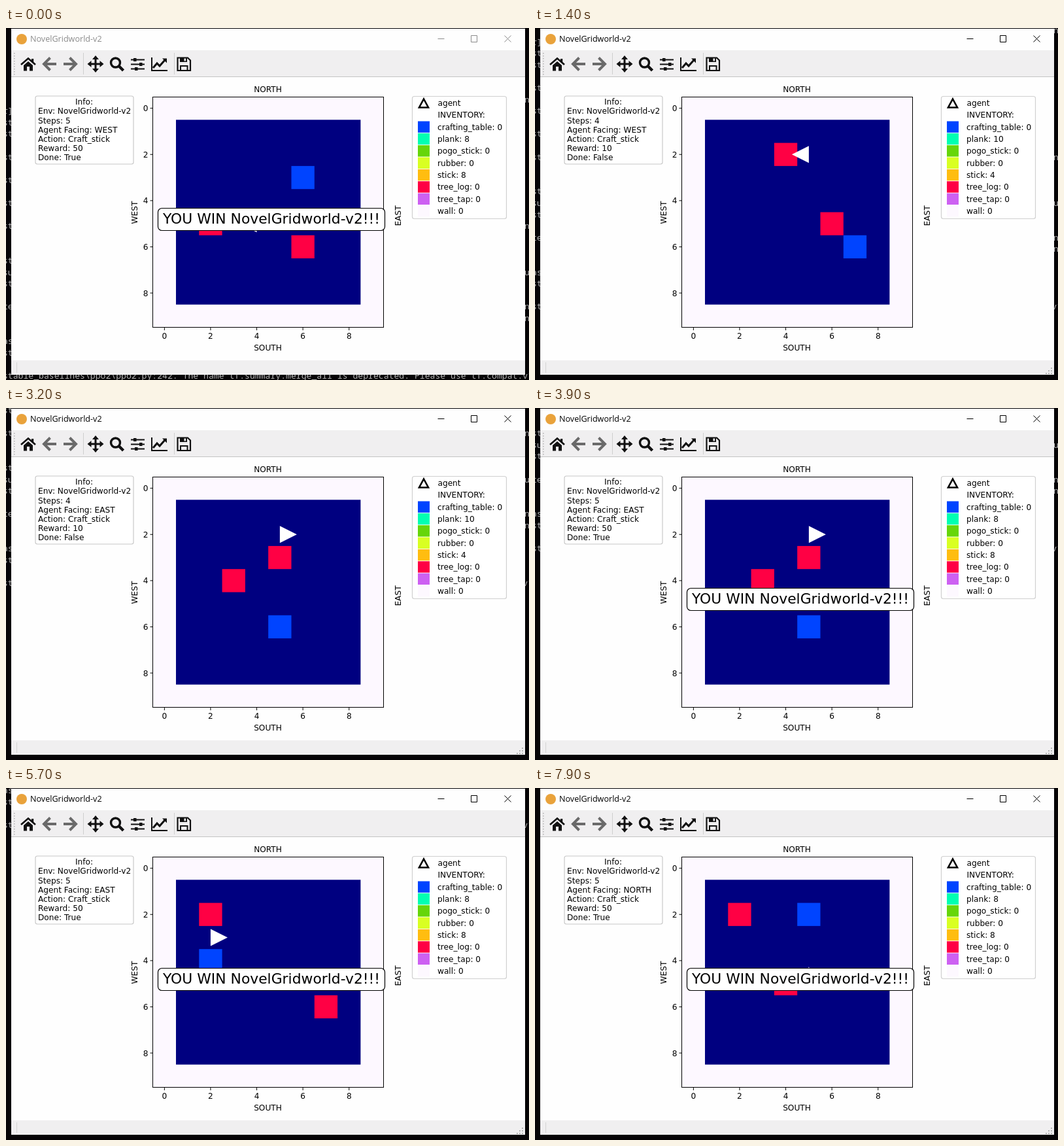
These frames come from a looping animation (800x538 px, 8000 ms). An HTML page with a canvas:

```html
<!DOCTYPE html>
<html>
<head>
<meta charset="utf-8">
<style>
html, body { margin: 0; width: 100%; height: 100%; overflow: hidden; background: #000; }
canvas { display: block; }
</style>
</head>
<body>
<canvas id="stage" width="800" height="538"></canvas>
<script>
const ctx = document.getElementById('stage').getContext('2d');
const LOOP = 8000, FIRST = 675, PERIOD = 1875, STEP = 200;
const CELL = 35.3, LEFT = 224.7, TOP = 105;
const BLUE = '#0044ff', RED = '#ff0044', WALL = '#fdf8ff', ICON = '#111';
const SANS = '"DejaVu Sans", sans-serif';

// [column, row] of the table, the logs and the agent
const episodes = [
  { table: [6, 3], logs: [[2, 5], [6, 6]], agent: [4, 5], facing: 'WEST' },
  { table: [7, 6], logs: [[4, 2], [6, 5]], agent: [5, 2], facing: 'WEST' },
  { table: [5, 6], logs: [[5, 3], [3, 4]], agent: [5, 2], facing: 'EAST' },
  { table: [2, 4], logs: [[2, 2], [7, 6]], agent: [2, 3], facing: 'EAST' },
  { table: [5, 2], logs: [[2, 2], [4, 5]], agent: [5, 5], facing: 'NORTH' },
];
const planks = [0, 4, 8, 12, 10, 8];

// Console rows, counted upwards from the last: left and right ends
const consoleRows = {
  0: ['stable_baselines\\ppo2\\ppo2.py:242. The name tf.summary.merge_all is deprecated. Please use tf.compat.v1', ''],
  2: ['st', ''], 3: ['as', ''], 5: ['', 'n'], 6: ['te', 'n'], 8: ['st', ''], 9: ['su', 'u'],
  10: ['st', ''], 13: ['st', 'n'], 15: ['st', ''], 17: ['st', ''], 19: ['st', ''],
  21: ['st', ''], 22: ['st', ''], 23: ['r]', ''], 24: ['', 'n'],
};

function stateAt(t) {
  let scroll = 0, index = 0, step = 5;
  for (let k = 0; k < 4; k++) {
    const local = t - FIRST - k * PERIOD;
    if (local >= -300) scroll += 2;
    if (local < 0) break;
    index = k + 1;
    step = Math.min(5, Math.floor(local / STEP) + 1);
    scroll += step + (step === 5 ? 2 : 0);
  }
  return { ...episodes[index], step, scroll, active: index > 0 };
}

function rect(x, y, w, h, color) {
  ctx.fillStyle = color;
  ctx.fillRect(x, y, w, h);
}

function text(s, x, y, { size = 12.15, align = 'left', color = '#000', font = SANS } = {}) {
  ctx.font = `${size}px ${font}`;
  ctx.textAlign = align;
  ctx.fillStyle = color;
  ctx.fillText(s, x, y);
}

function sideText(s, x, y) {
  ctx.save();
  ctx.translate(x, y);
  ctx.rotate(-Math.PI / 2);
  text(s, 0, 4.4, { align: 'center' });
  ctx.restore();
}

function stroke(d, width, color = ICON) {
  ctx.lineWidth = width;
  ctx.strokeStyle = color;
  ctx.stroke(new Path2D(d));
}

function fill(d, color = ICON) {
  ctx.fillStyle = color;
  ctx.fill(new Path2D(d));
}

function roundBox(x, y, w, h, r, line) {
  ctx.beginPath();
  ctx.roundRect(x, y, w, h, r);
  ctx.fillStyle = '#fff';
  ctx.fill();
  ctx.lineWidth = 1.2;
  ctx.strokeStyle = line;
  ctx.stroke();
}

function drawConsole(scroll) {
  rect(0, 0, 800, 538, '#060406');
  const style = { size: 13.13, font: '"Noto Sans Mono", monospace', color: '#b4b4b4' };
  for (const [row, [start, end]] of Object.entries(consoleRows)) {
    const y = 536 - (scroll + +row) * 17.6;
    text(start, -5, y, style);
    text(end, 793, y, style);
  }
}

function drawToolbar() {
  rect(8, 34, 786, 41, '#f0eff0');
  rect(8, 74, 786, 1, '#c4c4c4');
  for (let y = 38; y < 72; y += 4) rect(12, y, 1.5, 1.5, '#b0b0b0');
  rect(118, 38, 1, 33, '#cfcfcf');
  rect(257, 38, 1, 33, '#cfcfcf');

  stroke('M23 56L34 46.5L45 56', 2.6);
  fill('M39 47h3.2v6l-3.2-3zM27 57L34 51L41 57V65.5H36V59H32V65.5H27Z');
  stroke('M77 55H59M67.5 45.5L58 55L67.5 64.5', 4, '#6a6a6a');
  stroke('M88 55H106M97.5 45.5L107 55L97.5 64.5', 4, '#6a6a6a');
  stroke('M128 55H146M137 46V64', 3);
  fill('M137 42l5 6h-10zM137 68l5-6h-10zM124.5 55l6-5v10zM149.5 55l-6-5v10z');
  stroke('M174.5 53a7 7 0 1 1-14 0a7 7 0 1 1 14 0', 3.4);
  stroke('M172.5 58L179.5 65', 4.4);
  stroke('M191 48.5H212M191 55.5H212M191 62.5H212', 2);
  fill('M195 46h4.5v5H195zM204 53h4.5v5H204zM197 60h4.5v5H197z');
  stroke('M223 45V65H247', 2);
  stroke('M225 61L231 54L235 58L243 49', 3);
  fill('M239 46.5h7v7z');
  stroke('M262.5 45.5H278L282 49.5V65H262.5Z', 2.2);
  fill('M266 45h11v7h-11z');
  rect(272.5, 46.5, 2.6, 4, '#f0eff0');
  stroke('M267 65V58H277.5V65', 2);
}

function drawWindow(active) {
  rect(8, 1, 786, 529, '#fefefe');
  ctx.beginPath();
  ctx.arc(24, 17, 8, 0, 7);
  ctx.fillStyle = '#e9a23b';
  ctx.fill();
  const ink = active ? '#000' : '#8c8c8c';
  text('NovelGridworld-v2', 37, 21.4, { size: 12.6, color: ink, font: '"Open Sans", sans-serif' });
  stroke('M660.5 16.5H670.5M711.5 11.5H720.5V21.5H711.5ZM762.5 11.5L772.5 21.5M772.5 11.5L762.5 21.5', 1, ink);
  drawToolbar();
  rect(8, 508, 786, 22, '#f0eff0');
  rect(16, 511, 1, 16, '#d4d4d4');
  if (active) {
    for (let i = 0; i < 3; i++)
      for (let j = 0; j <= i; j++) rect(789 - 4 * j, 519 + 4 * i, 2, 2, '#b4b4b4');
  }
}

function drawCell([col, row], color) {
  rect(LEFT + col * CELL + CELL / 2 - CELL / 2, TOP + row * CELL, CELL, CELL, color);
}

function drawAgent([col, row], facing) {
  ctx.save();
  ctx.translate(LEFT + (col + 0.5) * CELL, TOP + (row + 0.5) * CELL);
  ctx.rotate({ EAST: 0, WEST: Math.PI, NORTH: -Math.PI / 2 }[facing]);
  fill('M0 -13L26 0L0 13Z', '#fff');
  ctx.restore();
}

function drawPlot(state) {
  rect(LEFT, TOP, 10 * CELL, 10 * CELL, WALL);
  rect(LEFT + CELL, TOP + CELL, 8 * CELL, 8 * CELL, '#000080');
  drawCell(state.table, BLUE);
  state.logs.forEach(log => drawCell(log, RED));
  drawAgent(state.agent, state.facing);
  ctx.lineWidth = 1;
  ctx.strokeStyle = '#000';
  ctx.strokeRect(224.5, 105.5, 353, 352);

  for (let n = 0; n < 10; n += 2) {
    const x = LEFT + (n + 0.5) * CELL, y = TOP + (n + 0.5) * CELL;
    rect(x - 0.5, 458, 1, 4, '#000');
    rect(220.5, y - 0.5, 4, 1, '#000');
    text(n, x, 475, { align: 'center' });
    text(n, 217.5, y + 4.6, { align: 'right' });
  }
  text('NORTH', 400.5, 98, { align: 'center' });
  text('SOUTH', 400.5, 493, { align: 'center' });
  sideText('WEST', 197, 282);
  sideText('EAST', 600, 287);
}

function drawInfo({ step, facing }) {
  roundBox(45, 104, 150, 104, 3, '#c8c8c8');
  text('Info:', 106, 117.3);
  [
    'Env: NovelGridworld-v2',
    `Steps: ${step}`,
    `Agent Facing: ${facing}`,
    `Action: ${step < 4 ? 'Craft_plank' : 'Craft_stick'}`,
    `Reward: ${step < 5 ? 10 : 50}`,
    `Done: ${step < 5 ? 'False' : 'True'}`,
  ].forEach((line, i) => text(line, 49, 131.4 + i * 14.1));
}

function drawLegend(step) {
  roundBox(621.5, 104.5, 144, 187, 3, '#d0d0d0');
  stroke('M639 108.5L646 121.5H632Z', 2.6, '#000');
  text('agent', 660.5, 119);
  text('INVENTORY:', 660.5, 137.3);
  [
    ['crafting_table', BLUE, 0],
    ['plank', '#00ffb2', planks[step]],
    ['pogo_stick', '#66d60a', 0],
    ['rubber', '#d9ff22', 0],
    ['stick', '#ffbd10', Math.max(0, step - 3) * 4],
    ['tree_log', RED, Math.max(0, 3 - step)],
    ['tree_tap', '#cd60f2', 0],
    ['wall', WALL, 0],
  ].forEach(([name, color, count], i) => {
    const y = 151.2 + i * 18.35;
    rect(630, y - 8.7, 18, 17.4, color);
    text(`${name}: ${count}`, 660, y + 4.4);
  });
}

function drawBanner() {
  roundBox(232.5, 275.5, 347, 34, 6, '#000');
  text('YOU WIN NovelGridworld-v2!!!', 406, 298.8, { size: 21.85, align: 'center' });
}

function draw(now) {
  const state = stateAt(Math.floor(now % LOOP / 100) * 100);
  drawConsole(state.scroll);
  drawWindow(state.active);
  drawPlot(state);
  drawInfo(state);
  drawLegend(state.step);
  if (state.step === 5) drawBanner();
}

const start = performance.now();
function tick() {
  draw(performance.now() - start);
  requestAnimationFrame(tick);
}
tick();
</script>
</body>
</html>
```
